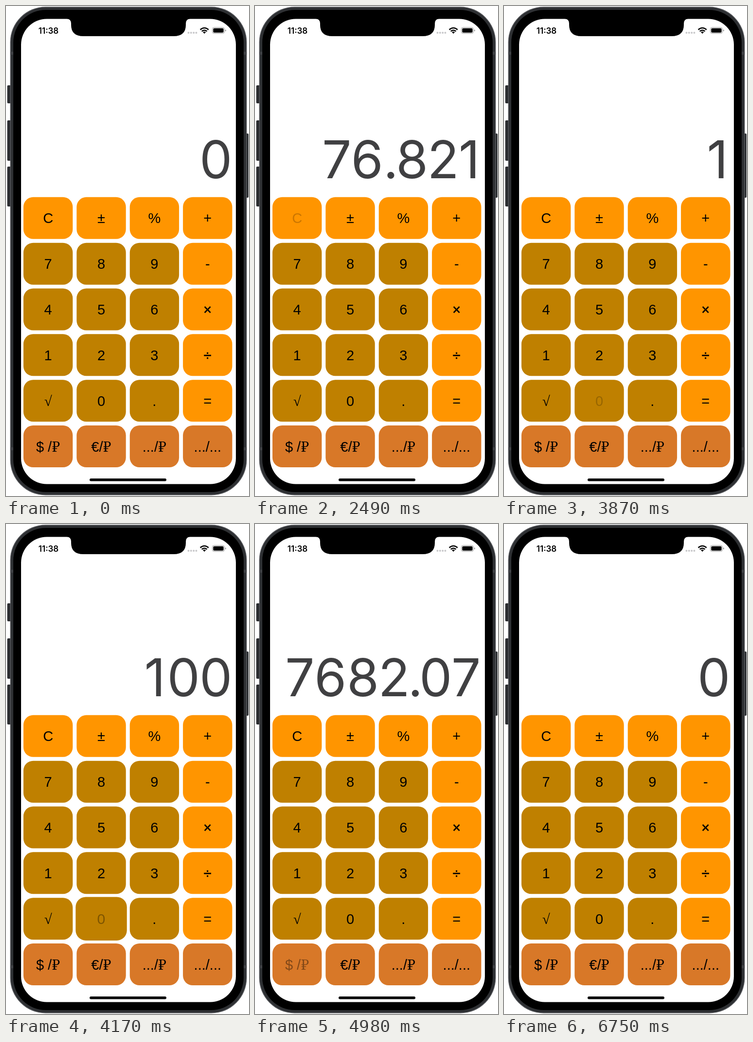
Animation, 500 px wide and 1007 px high, one loop 6.78 s. Source, as an HTML page:

```html
<!DOCTYPE html>
<html lang="en">
<head>
<meta charset="utf-8">
<title>Calculator</title>
<style>
  html, body { margin: 0; width: 100%; height: 100%; overflow: hidden; background: #fff; }
  svg { display: block; width: 100%; height: 100%; }
  .key text { font: 29px "Liberation Sans", Arial, sans-serif; text-anchor: middle; white-space: pre; }
  .key .serif { font-family: "Liberation Serif", "Noto Serif", serif; }
  .key .thick { stroke: #000; stroke-width: .6px; }
  #clock { font: 600 17px Inter, sans-serif; text-anchor: middle; }
  #display { font: 400 107px Inter, sans-serif; fill: #404042; }
</style>
</head>
<body>
<svg viewBox="0 0 500 1007">
  <!-- side buttons -->
  <g fill="#2b2d30">
    <rect x="2.5" y="163" width="9" height="37" rx="2"/>
    <rect x="2.5" y="235" width="9" height="83" rx="2"/>
    <rect x="2.5" y="330" width="9" height="82" rx="2"/>
    <rect x="490" y="262" width="9" height="132" rx="2"/>
  </g>
  <!-- body -->
  <rect x="8.5" y="1.5" width="487" height="1004" rx="73" fill="#55575b"/>
  <rect x="10" y="3" width="484" height="1001" rx="71.5" fill="#2e3033"/>
  <g fill="#3f4145">
    <rect x="9" y="94" width="6" height="6"/>
    <rect x="489" y="94" width="6" height="6"/>
    <rect x="9" y="907" width="6" height="6"/>
    <rect x="489" y="907" width="6" height="6"/>
  </g>
  <rect x="15" y="8" width="474" height="991" rx="67" fill="#000"/>
  <rect x="31" y="26.5" width="442" height="956" rx="53" fill="#fff"/>
  <path d="M125 26Q134 27 134 36V39Q134 62 159 62H345Q370 62 370 39V36Q370 27 379 26Z"/>
  <!-- status bar -->
  <text id="clock" x="87.5" y="56.5">11:38</text>
  <g fill="#c8c8ca">
    <circle cx="375.5" cy="55" r="2"/><circle cx="380.8" cy="55" r="2"/>
    <circle cx="386.2" cy="55" r="2"/><circle cx="391.5" cy="55" r="2"/>
  </g>
  <g fill="none" stroke="#000" stroke-width="2.6">
    <path d="M399.7 48.8Q408.2 41.2 416.7 48.8"/>
    <path d="M402.8 52.1Q408.2 47.4 413.6 52.1"/>
  </g>
  <path d="M405.1 53.7Q408.2 51.2 411.3 53.7L408.2 57Z"/>
  <rect x="424.5" y="44" width="25" height="12.5" rx="3.8" fill="none" stroke="#999"/>
  <rect x="426.3" y="45.8" width="21.4" height="8.9" rx="2.3"/>
  <path d="M451 48.3Q453 48.8 453 50.3Q453 51.8 451 52.3Z" fill="#999"/>

  <text id="display" y="354"></text>
  <g id="keys"></g>
  <rect x="172" y="971" width="158" height="5.5" rx="2.75"/>
</svg>

<script>
const LOOP = 6780, FADE = 300, PULSE = 95, DIM = 0.2;
const ORANGE = '#ff9500', BROWN = '#bf8000', RUST = '#d87828';
const ROWS = [
  ['C', '±', '%', '+'],
  ['7', '8', '9', '-'],
  ['4', '5', '6', '×'],
  ['1', '2', '3', '÷'],
  ['√', '0', '.', '='],
  ['$ /₽', '€/₽', '.../₽', '.../...']
];

// Horizontal centres of the glyphs for each reading
const READINGS = {
  '0': [432],
  '1': [437.5],
  '10': [371, 432],
  '100': [304.5, 365.5, 432],
  '76.821': [168.5, 230.5, 279.5, 323, 387.5, 439],
  '7682.07': [92.5, 155, 222, 286.5, 330, 372, 434.5]
};

// key, finger down, finger up, reading afterwards
const PRESSES = [
  ['$ /₽', 780, 935, '76.821'],
  ['C', 2490, 2580, '0'],
  ['1', 3420, 3455, '1'],
  ['0', 3870, 3950, '10'],
  ['0', 4020, 4095, '100'],
  ['$ /₽', 4740, 4885, '7682.07'],
  ['C', 6420, 6475, '0']
];

function add(parent, tag, attrs) {
  const node = document.createElementNS('http://www.w3.org/2000/svg', tag);
  for (const name in attrs) node.setAttribute(name, attrs[name]);
  return parent.appendChild(node);
}

function makeKey(label, row, col) {
  const x = 86.6 + col * 109.4, y = 435.8 + row * 93.85;
  const fill = row === 5 ? RUST : row === 0 || col === 3 ? ORANGE : BROWN;
  const group = add(document.getElementById('keys'), 'g', { class: 'key' });
  add(group, 'rect', { x: -50.7, y: -43, width: 101.4, height: 86, rx: 20, fill });
  const text = add(group, 'text', { y: 10.6 });
  for (const char of label) {
    const span = add(text, 'tspan', {});
    span.textContent = char;
    if ('√₽'.includes(char)) span.setAttribute('class', 'serif');
    if ('×÷'.includes(char)) span.setAttribute('class', 'thick');
  }
  const scale = s => group.setAttribute('transform', `translate(${x} ${y}) scale(${s})`);
  scale(1);
  return { text, scale };
}

const keys = {};
ROWS.forEach((labels, row) => labels.forEach((label, col) => {
  keys[label] = makeKey(label, row, col);
}));

const display = document.getElementById('display');
const pen = document.createElement('canvas').getContext('2d');
pen.font = '400 107px Inter, sans-serif';

function show(reading) {
  if (display.textContent === reading) return;
  const xs = READINGS[reading].map((centre, i) => {
    const box = pen.measureText(reading[i]);
    return centre - (box.actualBoundingBoxRight - box.actualBoundingBoxLeft) / 2;
  });
  display.setAttribute('x', xs.join(' '));
  display.textContent = reading;
}

const clamp = v => Math.min(1, Math.max(0, v));
const smooth = v => v * v * (3 - 2 * v);

function draw(t) {
  let reading = '0';
  const pose = {};
  for (const [key, down, up, result] of PRESSES) {
    pose[key] = pose[key] || { opacity: 1, scale: 1 };
    if (t < down) continue;
    const age = t - up;
    pose[key].opacity = DIM + (1 - DIM) * smooth(clamp(age / FADE));
    if (age < 0) continue;
    reading = result;
    pose[key].scale = 1 + 0.1 * clamp(1 - Math.abs(2 * age / PULSE - 1));
  }
  for (const key in pose) {
    keys[key].text.setAttribute('opacity', pose[key].opacity);
    keys[key].scale(pose[key].scale);
  }
  show(reading);
}

const start = performance.now();
function tick() {
  draw((performance.now() - start) % LOOP);
  requestAnimationFrame(tick);
}
tick();
</script>
</body>
</html>
```
